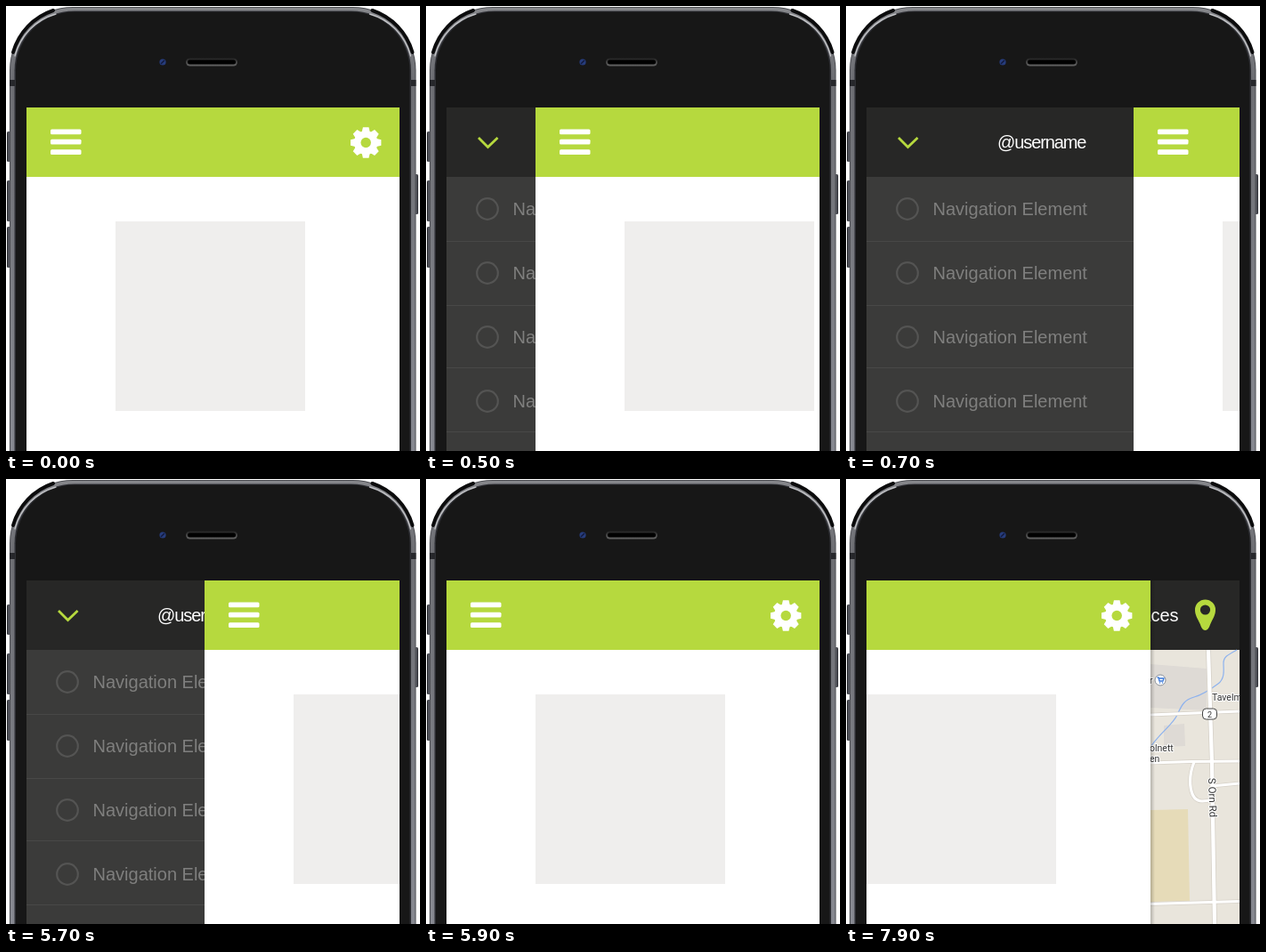
Write an HTML page that moves like this. It is 465 px wide and 500 px high and loops after 8 s.

```html
<!DOCTYPE html>
<html lang="en">
<head>
<meta charset="utf-8">
<title>Phone drawers</title>
<style>
  html, body { margin: 0; width: 100%; height: 100%; overflow: hidden; background: #fff; }
  svg { display: block; }
  text { font-family: "Liberation Sans", Arial, sans-serif; font-size: 20px; }
  .labels text { font: 10.5px Roboto, sans-serif; fill: #333; stroke: #fff; stroke-width: 2px; paint-order: stroke; }
</style>
</head>
<body>
<svg width="465" height="500" viewBox="0 0 465 500">
  <defs>
    <clipPath id="screen"><rect x="23" y="114" width="419" height="386"/></clipPath>
    <linearGradient id="rim" x2="0" y2="1">
      <stop offset="0" stop-color="#85868a"/>
      <stop offset=".13" stop-color="#6c6d72"/>
      <stop offset=".8" stop-color="#868890"/>
    </linearGradient>
    <linearGradient id="button"><stop stop-color="#26272b"/><stop offset=".5" stop-color="#5c5e67"/><stop offset="1" stop-color="#2b2c31"/></linearGradient>
    <linearGradient id="shade"><stop stop-opacity=".22"/><stop offset="1" stop-opacity="0"/></linearGradient>
    <linearGradient id="slot" x2="0" y2="1"><stop stop-color="#222"/><stop offset="1" stop-color="#666"/></linearGradient>
    <g id="corner" fill="none" stroke-linecap="round">
      <path d="M8 52A70 70 0 0 1 53 5" stroke="#0c0c0d" stroke-width="4"/>
      <path d="M10 56A66 66 0 0 1 56 9" stroke="#c4c5c8" stroke-width="1.3"/>
    </g>
    <path id="streets" d="M342 265 442 261M342 319 388 317.500 442 317M411 345 442 342M342 477.500 442 474.500M391 318C383 338 386 362 400 362L412 361" fill="none"/>
    <path id="avenue" d="M407 192 411 320 414 500" fill="none"/>
  </defs>

  <g id="phone">
    <g fill="url(#button)">
      <rect x="1" y="141" width="5" height="34" rx="1.5"/>
      <rect x="1" y="196" width="5" height="46" rx="1.5"/>
      <rect x="1" y="248" width="5" height="46" rx="1.5"/>
      <rect x="458" y="189" width="5" height="45" rx="1.5"/>
    </g>
    <rect x="4" y="1" width="456.5" height="620" rx="71" fill="#4b4c51"/>
    <rect x="5" y="2" width="454.5" height="620" rx="70" fill="url(#rim)"/>
    <rect x="9.500" y="5.500" width="445.500" height="620" rx="67" fill="#303136"/>
    <rect x="11" y="6.500" width="442.500" height="620" rx="66" fill="#171717"/>
    <use href="#corner"/>
    <use href="#corner" transform="translate(464.500) scale(-1 1)"/>
    <path d="M4 83H10V90H4ZM455 83H460.5V90H455Z" fill="#26272b"/>
    <circle cx="176" cy="63" r="3.6" fill="#263c7c"/>
    <path d="M174 65 178 61" stroke="#11183a" stroke-width="1.5"/>
    <rect x="202" y="58.5" width="58" height="9" rx="4.5" fill="url(#slot)"/>
    <rect x="204" y="60.5" width="54" height="5" rx="2.5" fill="#000"/>
  </g>

  <g clip-path="url(#screen)">
    <g id="menu">
      <rect x="23" y="114" width="300" height="78" fill="#272726"/>
      <rect x="23" y="192" width="300" height="308" fill="#3b3b3a"/>
      <path d="M59 148 69.5 158.5 80.5 148" fill="none" stroke="#b6d93e" stroke-width="2.8"/>
      <text x="170" y="160" fill="#fff" letter-spacing="-1.1">@username</text>
      <g id="rows"></g>
    </g>

    <g id="map">
      <rect x="142" y="114" width="300" height="78" fill="#272726"/>
      <text x="373.5" y="160" fill="#fff" text-anchor="end">Places</text>
      <path d="M403.5 170C400 170 399 166 397.5 162.500C395 157 392 153 392 147A11.5 11.5 0 0 1 415 147C415 153 412 157 409.5 162.500C408 166 407 170 403.5 170Z" fill="#b6d93e"/>
      <circle cx="403.5" cy="147" r="5.600" fill="#272726"/>
      <rect x="142" y="192" width="300" height="308" fill="#e9e5dc"/>
      <path d="M342 208 405 213V260L342 257ZM357 277 380 275 381 300 357 301Z" fill="#dedad5"/>
      <path d="M342 372 384 371 386 474 342 475Z" fill="#e6dbb8"/>
      <path d="M439 192C428 198 424 200 424 207S426 224 418 230 402 242 391 245 377 254 372 265 354 284 342 301" fill="none" stroke="#8db2ee" stroke-width="1.2"/>
      <use href="#streets" stroke="#d6d1c8" stroke-width="4.600"/>
      <use href="#avenue" stroke="#d6d1c8" stroke-width="5.800"/>
      <use href="#streets" stroke="#fff" stroke-width="3.200"/>
      <use href="#avenue" stroke="#fff" stroke-width="4.200"/>
      <rect x="400.5" y="258" width="16" height="12" rx="4" fill="#fff" stroke="#444"/>
      <circle cx="353" cy="226" r="6" fill="#fff" stroke="#8a9099"/>
      <path d="M349.5 223H351L352 227H356L357 224H351.5" fill="none" stroke="#3b78d8" stroke-width="1.3"/>
      <circle cx="352.5" cy="229" r=".8" fill="#3b78d8"/><circle cx="355.5" cy="229" r=".8" fill="#3b78d8"/>
      <g class="labels">
        <text x="406" y="267.5" style="font-size:9px">2</text>
        <text x="341" y="230">r</text>
        <text x="411" y="249">Tavelmo</text>
        <text x="341" y="306">olnett</text>
        <text x="341" y="318">en</text>
        <text transform="translate(407 336) rotate(88)" style="font-size:11.5px">S Orn Rd</text>
      </g>
    </g>

    <g id="panel">
      <rect x="442" y="114" width="5" height="386" fill="url(#shade)"/>
      <rect x="23" y="114" width="419" height="386" fill="#fff"/>
      <rect x="23" y="114" width="419" height="78" fill="#b6d93e"/>
      <g fill="#fff">
        <rect x="50" y="138.4" width="34.5" height="5.8" rx="1.5"/>
        <rect x="50" y="149.8" width="34.5" height="5.8" rx="1.5"/>
        <rect x="50" y="161.2" width="34.5" height="5.8" rx="1.5"/>
        <g id="gear" transform="translate(404.2 153.500)"><circle r="13.300"/></g>
      </g>
      <circle cx="404.2" cy="153.500" r="5.700" fill="#b6d93e"/>
      <rect x="123" y="242" width="213" height="213" fill="#efeeed"/>
    </g>
  </g>
</svg>
<script>
  const el = id => document.getElementById(id);

  el('rows').innerHTML = [228, 300, 372, 444].map((y, i) => `
    <circle cx="69" cy="${y}" r="11.8" fill="none" stroke="#545453" stroke-width="2.2"/>
    <text x="97.5" y="${y + 7}" fill="#7f7f7e">Navigation Element</text>
    <path d="M23 ${[264.5, 336.5, 406.5, 478.5][i]}H323" stroke="#484847"/>`).join('');

  el('gear').innerHTML += [0, 45, 90, 135].map(a =>
    `<path d="M-4.5-12-3.3-17.2H3.3L4.5-12V12L3.3 17.2H-3.3L-4.5 12Z" transform="rotate(${a})"/>`).join('');

  // Panel offset in px, from each start time in ms
  const steps = [[0, 0], [500, 100], [600, 200], [700, 300], [5700, 200], [5800, 100], [5900, 0], [7900, -100]];
  const LOOP = 8000;

  function draw(now) {
    const t = now % LOOP;
    const x = steps.findLast(([start]) => start <= t)[1];
    el('panel').setAttribute('transform', `translate(${x} 0)`);
    el('map').style.display = x < 0 ? '' : 'none';
    el('menu').style.display = x < 0 ? 'none' : '';
    requestAnimationFrame(() => draw(performance.now()));
  }
  draw(0);
</script>
</body>
</html>
```
